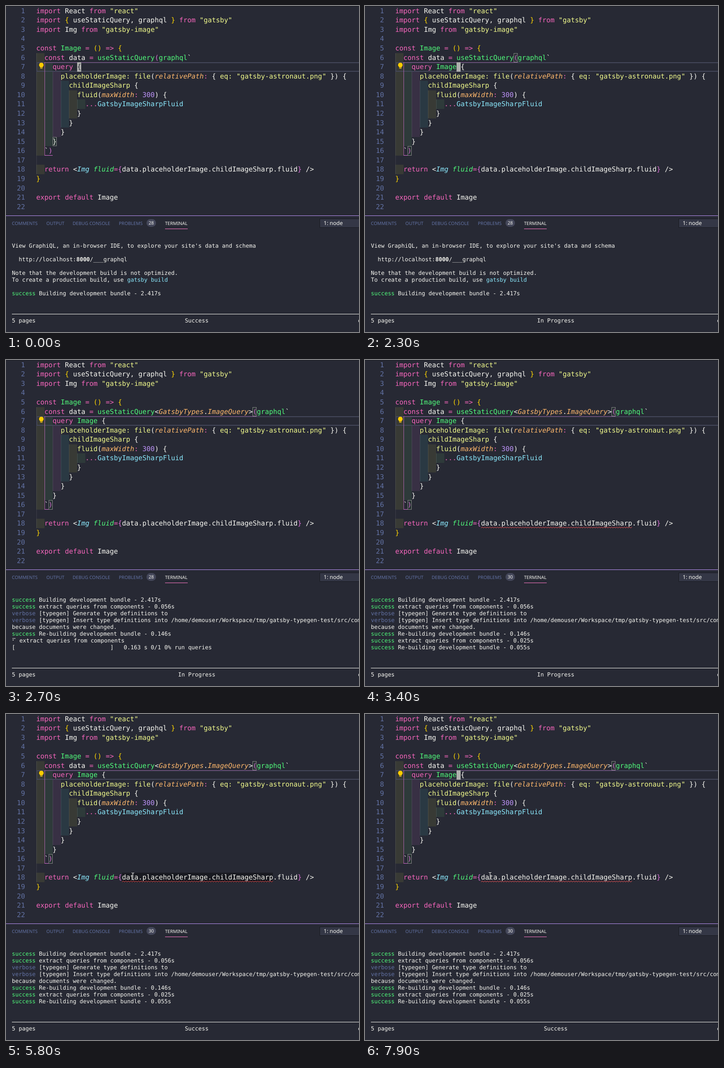
Write an HTML page that moves like this. It is 779 px wide and 719 px high and loops after 8 s.

```html
<!DOCTYPE html>
<html lang="en">
<head>
<meta charset="utf-8">
<title>Typed GraphQL query</title>
<style>
  html, body { margin: 0; width: 100%; height: 100%; overflow: hidden; background: #272934; }
  #stage {
    position: relative; width: 779px; height: 719px; overflow: hidden;
    color: #f8f8f2; text-rendering: geometricPrecision;
    font-family: "DejaVu Sans Mono", monospace;
  }
  #stage div, #stage span, #stage svg { position: absolute; white-space: pre; box-sizing: border-box; }
  .code { font-size: 14.97px; line-height: 20.57px; height: 20.57px; }
  .term { font-size: 12.43px; line-height: 15px; height: 15px; }
  .ui { font: 10.1px/16px "Noto Sans", sans-serif; color: #6272a4; }
  .num { width: 42px; text-align: right; color: #6272a4; }
  .match { border: 1px solid #888; background: rgba(0, 100, 0, .1); }
  .p { color: #f766bd; } .w { color: #f8f8f2; } .y { color: #f1fa8c; }
  .g { color: #50fa7b; } .G { color: #ffd700; } .o { color: #da70d6; }
  .c { color: #8be9fd; } .v { color: #bd93f9; } .b { color: #6272a4; }
  .i { color: #ffb86c; font-style: italic; }
  .C { color: #8be9fd; font-style: italic; }
  .F { color: #50fa7b; font-style: italic; }
  .B { font-weight: bold; }
</style>
</head>
<body>
<div id="stage"></div>
<script>
const stage = document.getElementById('stage');
const LOOP = 8000, STEP = 100;
const CODE = { x: 66.8, w: 9.012, h: 20.57 };
const TERM = { x: 13, w: 7.483, h: 15 };
const codeX = col => CODE.x + col * CODE.w;
const codeY = row => 0.7 + (row - 1) * CODE.h;

function add(tag, cls, x, y, style = {}, text = '') {
  const el = document.createElement(tag);
  el.className = cls;
  el.textContent = text;
  Object.assign(el.style, { left: x + 'px', top: y + 'px' }, style);
  return stage.appendChild(el);
}
const rect = (x, y, w, h, background) =>
  add('div', '', x, y, { width: w + 'px', height: h + 'px', background });
const show = (el, on) => { el.style.visibility = on ? 'visible' : 'hidden'; };

// "~k" starts a token of class k; each token sits on the character grid.
function setTokens(line, markup, cell) {
  if (line.markup === markup) return;
  line.markup = markup;
  line.replaceChildren();
  const [indent, ...tokens] = markup.split('~');
  let col = indent.length;
  for (const token of tokens) {
    const span = document.createElement('span');
    span.className = token[0];
    span.textContent = token.slice(1);
    span.style.left = col * cell.w + 'px';
    line.append(span);
    col += token.length - 1;
  }
}

const queryCall = type => '  ~pconst ~wdata ~p= ~guseStaticQuery' + type + '~o(~ggraphql~w`';
const queryHead = name => '    ~pquery ~g' + name + '~w{';
const TYPE = '~w<~iGatsbyTypes~w.~iImageQuery~w>';
const source = [
  '~pimport ~wReact ~pfrom ~y"react"',
  '~pimport ~G{ ~wuseStaticQuery, graphql ~G} ~pfrom ~y"gatsby"',
  '~pimport ~wImg ~pfrom ~y"gatsby-image"',
  '',
  '~pconst ~gImage ~p= ~G() ~p=> ~G{',
  queryCall(''),
  queryHead(''),
  '      ~yplaceholderImage: file~w(~irelativePath~p: ~w{ ~yeq: "gatsby-astronaut.png" ~w}) {',
  '        ~ychildImageSharp ~w{',
  '          ~yfluid~w(~imaxWidth~p: ~v300~w) {',
  '            ~p...~cGatsbyImageSharpFluid',
  '          ~w}',
  '        ~w}',
  '      ~w}',
  '    ~w}',
  '  ~w`~o)',
  '',
  '  ~preturn ~w<~CImg ~Ffluid~p=~o{~wdata.placeholderImage.childImageSharp.fluid~o} ~w/>',
  '~G}',
  '',
  '~pexport default ~wImage',
  ''
];

const success = text => '~gsuccess ~w' + text;
const history = [
  "~wView GraphiQL, an in-browser IDE, to explore your site's data and schema",
  '',
  '  ~whttp://localhost:~B8000~w/___graphql',
  '',
  '~wNote that the development build is not optimized.',
  '~wTo create a production build, use ~cgatsby build',
  '',
  success('Building development bundle - 2.417s'),
  success('extract queries from components - 0.056s'),
  '~bverbose ~w[typegen] Generate type definitions to',
  '~bverbose ~w[typegen] Insert type definitions into /home/demouser/Workspace/tmp/gatsby-typegen-test/src/components',
  '~wbecause documents were changed.',
  success('Re-building development bundle - 0.146s'),
  success('extract queries from components - 0.025s'),
  success('Re-building development bundle - 0.055s')
];
const pending = [
  '~w⠋ extract queries from components',
  '~w[' + ' '.repeat(28) + ']   0.163 s 0/1 0% run queries'
];

// Indent colours and guides
rect(0, 0, 779, 1, '#191a21');
const tints = ['255,255,64', '127,255,127', '255,127,255', '79,236,236'];
source.forEach((markup, i) => {
  const row = i + 1, depth = markup.match(/^ */)[0].length / 2;
  for (let d = 0; d < depth; d++)
    rect(codeX(2 * d), codeY(row), 2 * CODE.w, CODE.h, `rgba(${tints[d % 4]},.08)`);
});
for (let d = 0; d < 6; d++) {
  const first = 6 + d, last = d ? 16 - d : 18;
  rect(Math.round(codeX(2 * d)), codeY(first), 1, (last - first + 1) * CODE.h, 'rgba(255,255,255,.1)');
}

// Current line, bracket scope and highlights
add('div', '', 67, 124, { width: '720px', height: '21px', border: '2px solid #44475a' });
const scopeTop = rect(85, 124, 252, 1, 'rgba(218,112,214,.45)');
rect(85, 124, 1, 206, 'rgba(218,112,214,.7)');
rect(85, 329, 18, 1, '#da70d6');

const errorStart = codeX(21), errorWidth = 37 * CODE.w;
const hover = rect(errorStart, codeY(18), errorWidth, CODE.h, '#191a21');
const matchBox = (col, row) =>
  add('div', 'match', codeX(col), codeY(row), { width: '9px', height: '20.5px' });
const braceBox = matchBox(4, 15);
const parenOpen = matchBox(29, 6);
const parenClose = matchBox(3, 16);

// Editor text
const codeLines = source.map((markup, i) => {
  add('div', 'code num', 0, codeY(i + 1), {}, i + 1);
  const line = add('div', 'code', CODE.x, codeY(i + 1));
  setTokens(line, markup, CODE);
  return line;
});

function addSvg(x, y, w, h, body) {
  const box = add('div', '', x, y, { width: w + 'px', height: h + 'px' });
  box.innerHTML = `<svg width="${w}" height="${h}" style="left:0;top:0;overflow:visible">${body}</svg>`;
  return box;
}
let wave = 'M0 2.5';
for (let x = 2.8, up = true; x < errorWidth; x += 2.8, up = !up) wave += `L${x.toFixed(1)} ${up ? 0.3 : 2.5}`;
const squiggle = addSvg(errorStart, 367.8, errorWidth, 3,
  `<path d="${wave}" fill="none" stroke="#ff5555" stroke-width="1"/>`);

addSvg(72, 124, 12, 16,
  '<path d="M6 1a5 5 0 0 1 3 9v1.5H3V10A5 5 0 0 1 6 1z" fill="#ffcc00"/>' +
  '<path d="M3.5 12.2h5v2h-5z" fill="#d8b020"/>');

const caret = add('div', 'code', 0, 124, {
  width: '9px', height: '21px', background: '#aeafad', color: '#272934'
});

// Panel
rect(0, 461.5, 779, 1, '#bd93f9');
[['COMMENTS', 13], ['OUTPUT', 89], ['DEBUG CONSOLE', 147], ['PROBLEMS', 249], ['TERMINAL', 351]]
  .forEach(([label, x]) =>
    add('div', 'ui', x, 470.5, label === 'TERMINAL' ? { color: '#f8f8f2' } : {}, label));
rect(351, 491, 49.5, 1, '#ff79c6');
const badge = add('div', 'ui', 310, 470, {
  width: '21px', height: '17px', lineHeight: '17px', borderRadius: '9px',
  background: '#44475a', color: '#f8f8f2', textAlign: 'center'
});
add('div', 'ui', 692, 469, {
  width: '100px', height: '20px', paddingLeft: '8px', background: '#343746', color: '#f8f8f2',
  border: '1px solid #191a21', font: '12.1px/18px "Noto Sans", sans-serif'
}, '1: node');

// Terminal
const termLines = Array.from({ length: 8 }, (_, i) => add('div', 'term', TERM.x, 520.5 + i * TERM.h));
rect(13, 678.5, 766, 1, '#f8f8f2');
add('div', 'term', 13, 685.5, {}, '5 pages');
const status = add('div', 'term', 0, 685.5);
add('div', 'term', 776.5, 685.5, {}, 'c');

const beam = 'M1.5 1.5H3.5Q4.5 1.5 4.5 3V15Q4.5 16.5 3.5 16.5H1.5M7.5 1.5H5.5Q4.5 1.5 4.5 3M4.5 15Q4.5 16.5 5.5 16.5H7.5';
const mouse = addSvg(0, 0, 9, 18,
  `<path d="${beam}" fill="none" stroke="#191a21" stroke-width="2.4"/>` +
  `<path d="${beam}" fill="none" stroke="#fff" stroke-width="1"/>`);

// Timelines
const names = [[0, ''], [1300, 'Im'], [1400, 'Ima'], [1600, 'Imag'], [1700, 'Image'], [1900, 'Image ']];
const printed = [[0, 8], [2400, 9], [2500, 12], [2600, 13], [2800, 14], [2900, 15]];
const mousePath = [
  [4800, 612, 290], [5200, 287, 359], [5300, 287, 359], [5400, 280, 358], [6400, 280, 358],
  [6900, 272, 330], [7200, 272, 330], [7500, 287, 356], [7600, 287, 356], [7700, 276, 357]
];
const valueAt = (table, t) => table.findLast(([start]) => start <= t)[1];

function pointAt(t) {
  const next = mousePath.findIndex(([time]) => time > t);
  if (next < 0) return mousePath.at(-1).slice(1);
  if (next === 0) return null;
  const [t0, x0, y0] = mousePath[next - 1], [t1, x1, y1] = mousePath[next];
  const k = (t - t0) / (t1 - t0);
  return [x0 + (x1 - x0) * k, y0 + (y1 - y0) * k];
}

function render(t) {
  const name = valueAt(names, t);
  const typed = t >= 2600;
  setTokens(codeLines[5], queryCall(typed ? TYPE : ''), CODE);
  setTokens(codeLines[6], queryHead(name), CODE);

  const blinkOn = t < 600 || (t >= 1100 && t < 2400) || (t >= 2400 && Math.floor((t - 2400) / 500) % 2 === 1);
  show(caret, blinkOn);
  // The caret stays on the space after the finished name.
  const spaced = name.endsWith(' ');
  caret.style.left = codeX(10 + name.trim().length) + 'px';
  caret.textContent = spaced ? '' : '{';

  const inParens = t >= 2000;
  const parenCol = typed ? 53 : 29;
  show(braceBox, !inParens);
  show(parenOpen, inParens);
  show(parenClose, inParens);
  parenOpen.style.left = codeX(parenCol) + 'px';
  scopeTop.style.width = codeX(parenCol + 1) - 85 + 'px';

  const failing = t >= 3100;
  show(squiggle, failing);
  show(hover, t >= 5800 && t < 6400);
  badge.textContent = failing ? 30 : 28;

  let lines = history.slice(0, valueAt(printed, t));
  if (t >= 2700 && t < 2800) lines = lines.concat(pending);
  lines.slice(-8).forEach((markup, i) => setTokens(termLines[i], markup, TERM));

  const busy = t >= 2300 && t < 4000;
  status.textContent = busy ? 'In Progress' : 'Success';
  status.style.left = TERM.x + (busy ? 49 : 51) * TERM.w + 'px';

  const point = pointAt(t);
  show(mouse, point);
  if (point) mouse.style.transform = `translate(${point[0] - 4.5}px, ${point[1] - 9}px)`;
}

let shown = -1;
function tick() {
  const t = Math.floor(performance.now() % LOOP / STEP) * STEP;
  if (t !== shown) render(shown = t);
  requestAnimationFrame(tick);
}
tick();
</script>
</body>
</html>
```
